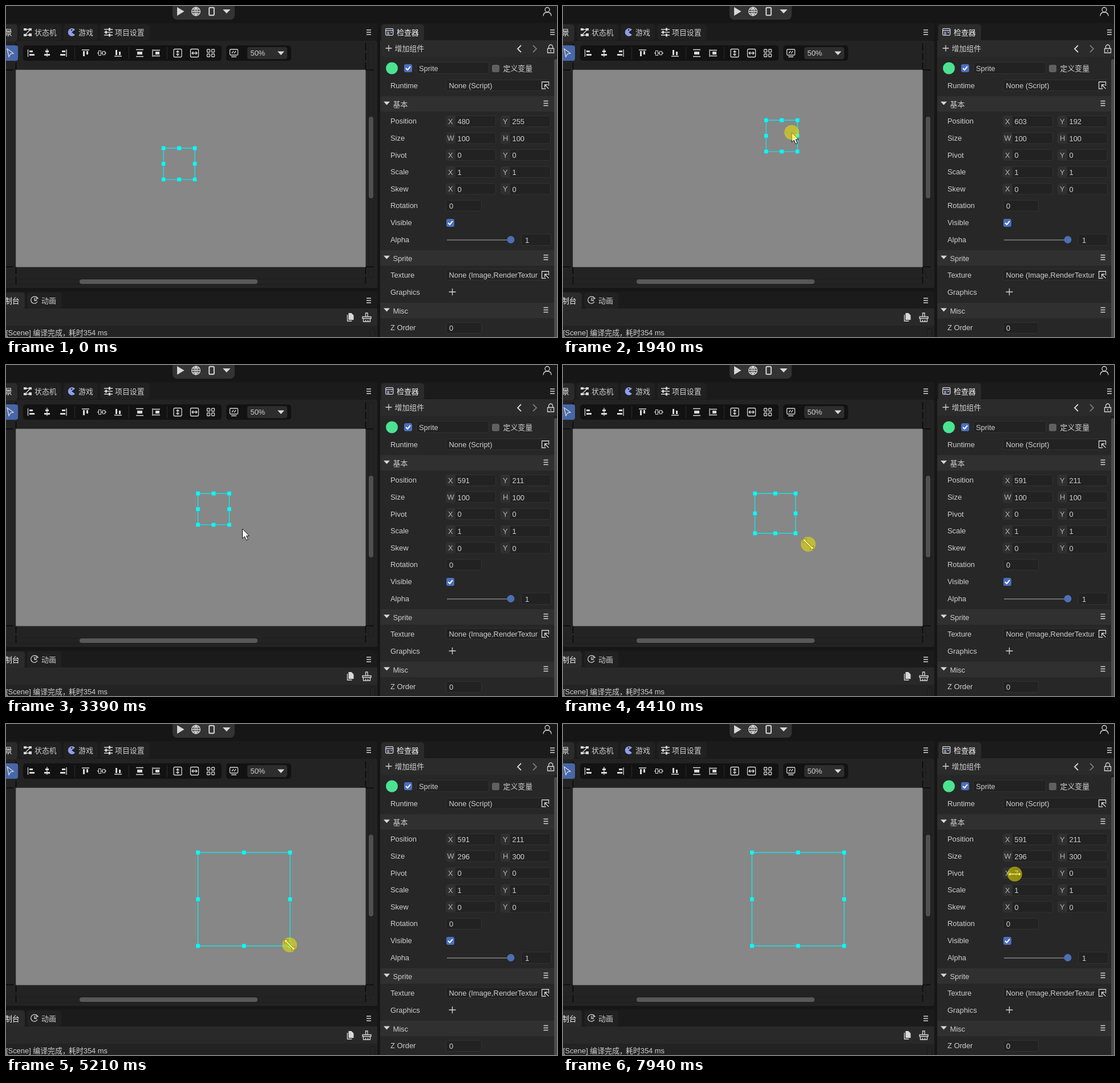
An HTML page for the animation above (7.99 s loop, 966 by 580 pixels).

```html
<!DOCTYPE html>
<html lang="zh-CN">
<head>
<meta charset="utf-8">
<style>
html, body { margin: 0; width: 100%; height: 100%; overflow: hidden; background: #161616; }
svg { display: block; }
text { font: 12.9px "Liberation Sans", "Noto Sans CJK SC", "Noto Sans CJK", sans-serif; fill: #cfcfcf; white-space: pre; }
.on { fill: #f2f2f2; font-weight: 500; }
.i { fill: none; stroke: #d8d8d8; stroke-width: 1.3; }
.f { fill: #d8d8d8; }
</style>
</head>
<body>
<svg id="stage" width="966" height="580" viewBox="0 0 966 580"></svg>
<script>
const stage = document.getElementById('stage');
let out = '';
const rect = (x, y, w, h, fill, r = 0, extra = '') =>
  out += `<rect x="${x}" y="${y}" width="${w}" height="${h}" rx="${r}" fill="${fill}" ${extra}/>`;
const text = (x, y, s, extra = '') => out += `<text x="${x}" y="${y}" ${extra}>${s}</text>`;
const line = (d, extra = '') => out += `<path class="i" d="${d}" ${extra}/>`;
const solid = (d, extra = '') => out += `<path class="f" d="${d}" ${extra}/>`;
const circle = (x, y, r, extra) => out += `<circle cx="${x}" cy="${y}" r="${r}" ${extra}/>`;
const menu = (x, y) => line(`M${x - 4} ${y - 4}h8m-8 4h8m-8 4h8`);
const field = (x, y, w, h = 20) => rect(x + .5, y + .5, w - 1, h - 1, '#222', 3, 'stroke="#323232"');
const check = (x, y) => {
  rect(x, y, 14, 14, '#4a6fbd', 3);
  line(`M${x + 3} ${y + 7}l3 3 5-6`, 'style="stroke:#fff;stroke-width:2"');
};
const pick = (x, y) => {
  line(`M${x + 7} ${y + 12}H${x}V${y}H${x + 12}V${y + 7}`);
  line(`M${x + 12} ${y + 12}l-7-7m0 5v-5h5`);
};
const pair = (y, a, b, va, vb, ida, idb) =>
  [[771, a, va, ida], [867, b, vb, idb]].forEach(([x, k, v, id]) => {
    field(x, y - 10, 88);
    rect(x + 1, y - 9, 16, 18, '#303030', 2);
    text(x + (k == 'W' ? 2.5 : 4), y + 4.5, k, 'style="fill:#b4b4b4"');
    text(x + 20.5, y + 5, v, id ? `id="${id}"` : '');
  });
const header = (y, s) => {
  rect(656, y - 13.5, 305, 27, '#303030');
  solid(`M662 ${y - 4}h11l-5.5 6z`);
  text(678.5, y + 5, s);
  menu(946.5, y - 1);
};

// Top bar
rect(292, -10, 109, 34, '#333', 8);
solid('M300 2l12.5 7.5-12.5 7.5z');
circle(333, 9.5, 7.4, 'class="i"');
line('M325.5 9.5h15M333 2v15M327 5.5h12M327 13.5h12M333 2q-7 7.5 0 15q7-7.5 0-15');
rect(356.2, 2.7, 8.6, 13.6, 'none', 1.5, 'class="i" style="stroke-width:2"');
solid('M380 6h13.5l-6.7 7z');
circle(949, 6.5, 4, 'class="i"');
line('M942 17.5q0-6.5 7-6.5t7 6.5');

// Scene panel
rect(0, 30, 651, 32, '#1b1b1b', 4);
rect(0, 61, 651, 433, '#232323', 3);
rect(-8, 32, 28, 30, '#2b2b2b', 5);
[[24, 73], [101, 60], [165, 87]].forEach(([x, w]) => rect(x, 32, w, 28, '#212121', 5));
text(-15, 50.5, '场景', 'class="on"');
text(50, 50.5, '状态机');
text(127, 50.5, '游戏');
text(191, 50.5, '项目设置');
solid('M31 39h5v4h-5zM40 39h5v4h-5zM40 48h5v5h-5zM31 49h5v4h-5z');
line('M36 41h4M34 50l8-8M36 51h4');
solid('M121 41.5a7 7 0 1 0 0 9l-6-4.5z', 'style="fill:#8f9fee"');
circle(115, 42, 1.3, 'fill="#222"');
line('M172 41h15M172 46h15M172 51h15');
solid('M180 38.5h3v5h-3zM174 43.5h3v5h-3zM180 48.5h3v5h-3z');
menu(636, 46);

// Ruler dashes around the canvas
line('M17.5 65v47M17.5 457v34M630.5 65v47M630.5 457v34M0 112h17M631 112h14M0 457h17M631 457h14',
  'style="stroke:#080808;stroke-width:1.5" stroke-dasharray="13 4"');
rect(17.2, 111.8, 613.3, 345.7, '#878787');
rect(635.5, 65.5, 9, 410, 'none', 4, 'stroke="#1d1d1d"');
rect(636, 194, 8, 143, '#505050', 4);
rect(0, 478.5, 632, 9, 'none', 4, 'stroke="#1d1d1d"');
rect(129, 479, 312, 8, '#585858', 4);

// Scene toolbar
rect(-6, 69, 27, 27, '#4767a8', 4);
line('M2 75l3 14 3-5 5-1z');
rect(30, 69, 348, 27, '#121212', 5);
rect(386, 69, 114, 27, '#121212', 5);
line('M120.5 72v21M215.5 72v21M282.5 72v21', 'style="stroke:#2b2b2b;stroke-width:1"');
line('M38.5 76v13M72 75v14M106 76v13M133 77h13M160 82.5h16M190 88h13M228 76.5h13M228 88.5h13M257 76v13');
solid('M41 78h6v3h-6zM41 84h9v3h-9zM69 78h6v3h-6zM67 84h10v3h-10zM98 78h6v3h-6zM95 84h9v3h-9z' +
  'M135 79h3v9h-3zM141 79h3v6h-3zM192 77h3v9h-3zM198 80h3v6h-3zM230 80h9v5h-9z');
rect(162.5, 78.5, 4, 8, '#121212', 0, 'stroke="#d8d8d8"');
rect(169.5, 79.5, 4, 6, '#121212', 0, 'stroke="#d8d8d8"');
line('M258 77.5h12M258 87.5h12');
solid('M262 80h7v5h-7z');
[294, 323.5].forEach(x => rect(x, 75.5, 14, 14, 'none', 2, 'class="i"'));
line('M301 78.5v8m-2.5-5.5l2.5-2.5 2.5 2.5m-5 3l2.5 2.5 2.5-2.5M326 82.5h9m-6.5-2.5l-2.5 2.5 2.5 2.5m4-5l2.5 2.5-2.5 2.5');
[352.5, 360.5].forEach(x => [76, 84].forEach(y => rect(x, y, 5, 5, 'none', 1, 'class="i"')));
rect(392.5, 76, 14, 10, 'none', 1.5, 'class="i"');
line('M395 89h9M396 83l3-4M400 83l3-4');
rect(423, 72, 70, 21, '#2d2d2d', 4);
text(428.5, 87, '50%');
solid('M476 79.5h12l-6 6.5z');

// Console panel
rect(0, 500, 651, 31, '#1b1b1b', 4);
rect(0, 530, 651, 50, '#292929');
rect(0, 560, 651, 20, '#232323');
rect(-8, 502, 41, 29, '#2b2b2b', 5);
rect(37, 502, 60, 28, '#212121', 5);
text(-15, 520.5, '控制台', 'class="on"');
text(62, 520.5, '动画');
line('M54 511a6 6 0 1 0 1 7M50 511.5v4.5h4M53 509.5l3 3-4 1');
menu(636, 516);
solid('M600.5 538h5l4 4v8h-9z');
line('M598.5 541v11h8');
line('M630.5 544v-6h3.5v6M625 544.5h15v3h-15zM626.5 548v5h12v-5M630.5 553v-3M634.5 553v-3');
rect(638.5, 564.5, 8, 30, 'none', 4, 'stroke="#191919"');
text(0, 577, '[Scene] 编译完成，');
text(110, 577, '耗时354 ms');

// Inspector
rect(656, 30, 310, 32, '#1b1b1b', 4);
rect(656, 60, 310, 520, '#272727');
rect(656, 60, 310, 29, '#2b2b2b');
rect(658, 32, 75, 30, '#2b2b2b', 5);
rect(665.7, 39.7, 13, 11.6, 'none', 1.5, 'class="i"');
line('M666 43h13M668 46.5h4M674 46.5h3M668 49h4', 'style="stroke:#b9c8f0"');
text(685, 50.5, '检查器', 'class="on"');
menu(958, 46);
line('M671 68.5v11M665.5 74h11');
text(681.5, 79, '增加组件');
line('M903 69l-6 6 6 6', 'style="stroke-width:1.8"');
line('M924 69l6 6-6 6', 'style="stroke:#777;stroke-width:1.8"');
line('M949.5 74.5h11v7.5h-11zM951.5 74v-2.5a3.5 3.5 0 0 1 7 0v2.5M955 77v3');
circle(676.5, 109, 10.5, 'fill="#4be391"');
check(698, 102);
field(719, 98, 128, 21);
text(724, 114, 'Sprite');
rect(852, 103, 13, 13, '#606060', 3);
text(871.5, 113.5, '定义变量');
[['Runtime', 139], ['Position', 201.5], ['Size', 231], ['Pivot', 261], ['Scale', 290.5], ['Skew', 320],
 ['Rotation', 349.5], ['Visible', 379.5], ['Alpha', 409], ['Texture', 471.5], ['Graphics', 501], ['Z Order', 563.5]]
  .forEach(([s, y]) => text(674, y + 4.5, s));
[[129, 'None (Script)'], [461, 'None (Image,RenderTextur']].forEach(([y, s]) => {
  field(771, y, 184);
  text(776.5, y + 14.5, s);
  pick(939.5, y + 4);
});
header(171.5, '基本');
pair(202, 'X', 'Y', 480, 255, 'px', 'py');
pair(231.5, 'W', 'H', 100, 100, 'sw', 'sh');
pair(261, 'X', 'Y', 0, 0, 'pv');
pair(291, 'X', 'Y', 1, 1);
pair(320.5, 'X', 'Y', 0, 0);
field(771, 340, 63);
text(777, 355, '0');
check(772, 373);
rect(773, 409, 112, 2, '#6c6c6c');
circle(885, 409.5, 6.5, 'fill="#4c6fb5"');
field(903, 399, 53, 21);
text(910, 414.5, '1');
header(441.5, 'Sprite');
line('M782.5 495v12M776.5 501h12');
header(533.5, 'Misc');
field(771, 554, 63);
text(777, 569, '0');
rect(961, 89, 5, 491, '#202020');
rect(961, 93, 6, 500, '#4b4b4b', 3);

// Moving parts
out += '<g id="box"><path fill="none" stroke="#00f6f6" stroke-width="1.2"/><path fill="#0ff"/></g>';
out += `<g id="cursor" stroke="#111" fill="#fff">
  <path d="M0 0V17L4 13.4 7 20.2 9.8 19 7 12.4H12Z"/>
  <path d="M-9-9H-2.5L-4.7-6.8 6.8 4.7 9 2.5V9H2.5L4.7 6.8-6.8-4.7-9-2.5Z"/>
  <path d="M-9-9H-2.5L-4.7-6.8 6.8 4.7 9 2.5V9H2.5L4.7 6.8-6.8-4.7-9-2.5Z" transform="rotate(-45) scale(.87)"/>
  <circle r="13" fill="#eee600" fill-opacity=".55" stroke="none"/></g>`;
stage.innerHTML = out;

const $ = id => document.getElementById(id);
const [outline, handles] = $('box').children;
const [arrow, diagonal, sideways, halo] = $('cursor').children;
const ZOOM = 0.5445, LOOP = 7990, STEP = 1000 / 15;
const MOVE = 22, MOVED = 42, SIZE = 64, SIZED = 95, PIVOT = 114;

// Pointer path: step, x, y
const path = [
  [0, 1010, 520], [1, 952, 509], [4, 800, 415], [8, 550, 235], [10, 450, 216], [13, 371, 268],
  [16, 345, 273], [19, 311, 276], [22, 311, 276], [25, 343, 265], [27, 378, 241.7], [28, 391, 227],
  [29, 401, 221.5], [30, 406, 219], [32, 398, 228], [34, 382, 241], [36, 371.4, 252], [41, 371.4, 252],
  [44, 440, 262], [47, 594, 284], [49, 520, 286], [51, 414.5, 287], [53, 399, 281], [54, 386, 270],
  [59, 386, 270], [60, 393, 279], [63, 393, 279], [64, 390.6, 278.1], [65, 407, 293], [66, 430, 314],
  [69, 465, 350], [72, 485, 371], [75, 495.5, 384], [76, 497.2, 387], [95, 497.2, 387], [97, 530, 390],
  [100, 640, 345], [103, 730, 290], [106, 768, 266], [108, 774, 263], [110, 776, 263], [114, 776, 263],
  [115, 777, 263], [116, 779, 263], [117, 783, 263], [118, 785.5, 263], [119, 792, 263]
];
function pointer(n) {
  const k = Math.max(1, path.findIndex(p => p[0] >= n));
  const [a, ax, ay] = path[k - 1], [b, bx, by] = path[k], u = (n - a) / (b - a);
  return [ax + (bx - ax) * u, ay + (by - ay) * u];
}
function dragged(n, from, to) {
  const [x, y] = pointer(Math.min(Math.max(n, from), to)), [x0, y0] = pointer(from);
  return [x - x0, y - y0];
}
function sprite(n) {
  const [x, y] = dragged(n, MOVE, MOVED - 1), [w, h] = dragged(n, SIZE, SIZED - 1);
  return { x, y, w, h, pivot: dragged(n, PIVOT, 119)[0] };
}
const show = (el, on) => el.style.display = on ? '' : 'none';

function draw(now) {
  const n = Math.min(119, Math.floor((now % LOOP + 12) / STEP));

  // The outline trails the pointer by one step, the numbers by two
  const s = sprite(n - 1), v = sprite(n - 2);
  const x = 276.1 + s.x - s.pivot * ZOOM, y = 249.1 + s.y, w = 54.9 + s.w, h = 54.9 + s.h;
  outline.setAttribute('d', `M${x} ${y}h${w}v${h}h${-w}z`);
  let d = '';
  for (const i of [0, .5, 1]) for (const j of [0, .5, 1])
    if (i != .5 || j != .5) d += `M${x + w * i - 3.3} ${y + h * j - 3.3}h6.6v6.6h-6.6z`;
  handles.setAttribute('d', d);
  $('px').textContent = Math.round(480 + v.x / ZOOM);
  $('py').textContent = Math.round(255 + v.y / ZOOM);
  $('sw').textContent = Math.round(100 + v.w / ZOOM);
  $('sh').textContent = Math.round(100 + v.h / ZOOM);
  $('pv').textContent = Math.round(v.pivot);

  $('cursor').setAttribute('transform', `translate(${pointer(n)})`);
  const diag = n >= 60 && n < SIZED, side = n >= 108;
  show(diagonal, diag);
  show(sideways, side);
  show(arrow, !diag && !side);
  show(halo, n >= MOVE && n < MOVED || n >= SIZE && n < SIZED || n >= PIVOT);
  requestAnimationFrame(draw);
}
requestAnimationFrame(draw);
</script>
</body>
</html>
```
